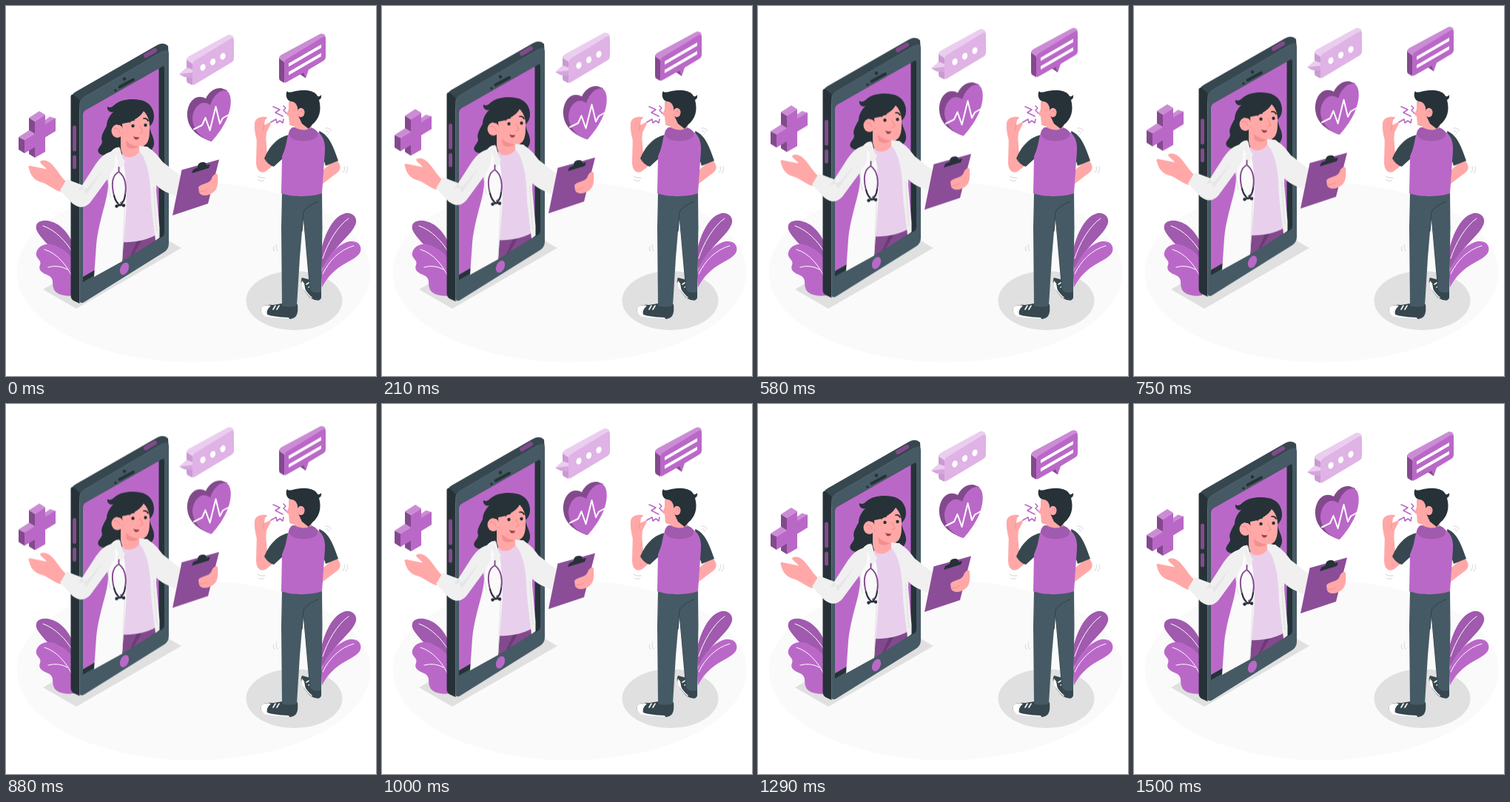
Write an HTML page that moves like this. It is 500 px wide and 500 px high and loops after 1.54 s.

```html
<!DOCTYPE html>
<html lang="en">
<head>
<meta charset="utf-8">
<title>Online doctor</title>
<style>
html, body { margin: 0; width: 100%; height: 100%; overflow: hidden; background: #fff; }
svg { display: block; width: 100vw; height: 100vh; }
.float { animation: float 1540ms linear infinite; }
@keyframes float {
  0% { transform: translateY(0); }
  47.1% { transform: translateY(-9.6px); }
  95.6% { transform: translateY(.4px); }
  97.4%, 100% { transform: translateY(0); }
}
.p { fill: #ba68c8; }
.pd { fill: #824a8c; }
.pm { fill: #a05aae; }
.pl { fill: #cb8cd5; }
.ink { fill: #263238; }
.slate { fill: #37474f; }
.steel { fill: #455a64; }
.skin { fill: #ffa8a7; }
.blush { fill: #f28f8f; }
.coat { fill: #fafafa; }
.sleeve { fill: #f0f0f0; }
.fold { fill: #e6e6e6; }
.w { fill: #fff; }
.grey { fill: #e0e0e0; }
.ln { fill: none; stroke-linecap: round; stroke-linejoin: round; }
.white { stroke: #fff; }
.dark { stroke: #263238; }
.shade { stroke: #d9d9d9; }
</style>
</head>
<body>
<svg viewBox="0 0 500 500">
  <!-- ground -->
  <ellipse cx="253.500" cy="360" rx="239" ry="121.500" fill="#fafafa"/>
  <path class="grey" d="M50 383L95 409L237 327L192 301Z"/>
  <ellipse class="grey" cx="389.500" cy="398" rx="65" ry="40"/>

  <!-- left plant -->
  <path class="pm" d="M92 346C75 340 53 322 43 306C37 296 43 289 55 290C73 292 86 308 92 326Z"/>
  <path class="ln white" d="M50 297C67 303 81 318 90 333"/>
  <path class="p" d="M92 391C82 393 67 391 64 381C62 373 65 368 57 364C49 361 43 357 46 350C49 343 39 341 41 333C44 322 59 318 71 326C82 331 88 338 92 346Z"/>
  <path class="ln white" d="M52 329C69 334 82 350 90 367M57 353Q71 349 83 356"/>

  <g class="float">
    <!-- phone -->
    <path class="slate" d="M88 127Q87 120 94 116L204 53Q213 48 219 54L220 70L106 134L100 140Z"/>
    <path class="ink" d="M87.500 122Q88 119 91 120L99.500 127V402L93 399Q87.500 397 87.500 391Z"/>
    <path class="steel" d="M99.500 135Q99.500 127 106 123L211 61.500Q220 56 220 66V321Q220 329 213 333L105 400.500Q99.500 403 99.500 397Z"/>
    <path class="ln" stroke="#5f737d" stroke-width=".6" d="M99.500 397V135Q99.500 127 106 123L211 61.500"/>
    <path class="ln" stroke="#824a8c" stroke-width="6" d="M189 67L201 60"/>
    <path class="ln" stroke="#824a8c" stroke-width="5" d="M92.500 164V194M92.500 204V218"/>
    <path class="ln dark" stroke-width="4" d="M153.500 109.500L172 99.500"/>
    <circle class="ink" cx="160" cy="98.500" r="2.200"/>
    <circle class="ink" cx="148" cy="114" r="1.800"/>
    <path class="ink" d="M104 146Q104 143 107 141L211 82Q214 80 214 84V307Q214 310 211 312L104 373Z"/>
    <path class="p" d="M104 146Q104 143 107 141L206.500 84.500V307L104 366Z"/>
    <ellipse class="p" cx="160" cy="355" rx="5.500" ry="8.800" transform="rotate(24 160 355)"/>

    <!-- doctor -->
    <path class="ink" d="M145 143C139 145 136 139 137 136C140 138 143 137 146 134C155 126 170 125 181 127C194 129 200 139 200 149C200 156 197 160 194 163C195 172 201 178 200 187C198 196 192 200 184 201L147 200C140 204 129 203 125 198C122 192 130 189 130 183C127 176 133 168 136 162C136 154 141 147 145 143Z"/>
    <path class="pd" d="M157 316L202 306V317L157 345Z"/>
    <path fill="#6c3b76" d="M177 318L168 338L172 336L184 316Z"/>
    <path fill="#e8d0ed" d="M157 198L183 194C193 203 197 230 198 252L203 309C190 317 171 320 156 319Z"/>
    <path class="sleeve" d="M178 190L191 190C199 196 203 205 204 217L203 250L207.500 300V313L202 317L197 275C194 248 198 220 178 190Z"/>
    <path class="ln shade" stroke-dasharray="3 2" d="M200 246Q201 276 204 305"/>
    <path class="sleeve" d="M182 189C197 190 205 202 212 211L238 231L229 257C214 251 205 246 199 237Z"/>
    <path class="coat" d="M150 191C136 196 133 216 137 234C142 253 126 283 122 323L119 366L157 345L162 278C164 249 162 218 154 192Z"/>
    <path class="ln shade" stroke-width=".8" d="M140 222Q136 238 141 257M161 260L157 342"/>
    <path class="skin" d="M82 238C74 231 69 221 62 214C56 208 48 207 46 210.500C47 214 52 216 55 220.500L33 216Q29 216 31 219.500C33 228 37 235 47 238C56 240 65 249 74 251Z"/>
    <path class="sleeve" d="M148 195C134 198 129 203 121 214L103 242L82 234L73 249L90 267C100 275 109 272 115 264L137 234L147 217Z"/>
    <path class="fold" d="M103 242L97 250L110 246L132 220L108 255Z"/>

    <path class="skin" d="M155 172L181 184V194C179 202 168 207 160 203Q155 198 155 190Z"/>
    <path class="blush" d="M162 181Q169 190 180 189Q171 196 163 190Z"/>
    <path class="skin" d="M157 159C169 158 180 151 186 142C193 149 195 159 194 169C194 184 189 190 181 190C172 189 162 183 158 178Z"/>
    <ellipse class="skin" cx="150.500" cy="169" rx="8" ry="9"/>
    <path class="ln" stroke="#f28f8f" d="M146 166Q152 163 154 171"/>
    <path class="ink" d="M150 160C156 163 158 159 158 156C173 156 183 149 186 141L175 133L151 142Z"/>
    <circle class="ink" cx="171.500" cy="162" r="2.200"/>
    <circle class="ink" cx="188.500" cy="161" r="2.200"/>
    <path class="ln dark" stroke-width="1.800" d="M167 157Q168 154 173 154M186 152Q190 151 192 155"/>
    <path class="ln" stroke="#f28f8f" stroke-width="1.200" d="M181 162L185 170L181 172"/>
    <path fill="#9c434a" d="M172 176Q176 178 180 177Q179 182 174 180Z"/>

    <path class="sleeve" d="M146 197L153 190Q154 203 161 210L155 222L150 215L152 210Z"/>
    <path class="sleeve" d="M180 196L180 189L188 190L197 209L192 212Z"/>
    <g class="ln" stroke-width="1.900">
      <path stroke="#824a8c" d="M152.500 218V224C143 229 143 242 145 252Q147 262 151 266M152.500 224C162 231 163 245 161 255Q160 264 155 266"/>
      <path class="dark" d="M146 256Q148 266 154 269Q160 266 161 255M149.500 270L158 269"/>
    </g>
    <circle class="ink" cx="149.500" cy="270.500" r="2.200"/>
    <circle class="ink" cx="159" cy="269.500" r="2.200"/>

    <!-- clipboard -->
    <path fill="#8b4d98" d="M237.500 221.500L288 207.500L273 267L225 283Z"/>
    <path class="ink" d="M251 226L253 221L259 218Q259 211 266 211Q271 211 271 215L276 214L274 219Z"/>
    <path class="skin" d="M260 245C264 239 275 241 278 233C279 228 286 224 286 229C287 239 286 247 281 251C274 257 264 258 261 252Z"/>
    <path class="ln" stroke="#f28f8f" d="M262 251Q268 251 272 248"/>

    <!-- cross -->
    <path class="pd" d="M17 177L25 181V199L17 194ZM31 151L39 156V173L31 168ZM31 195L39 190V205L31 200Z"/>
    <path class="pl" d="M17 177L31 168L39 172.500L25 181ZM31 151L45 142L53 147L39 156ZM53 154L59.500 149.500L67 152L53 161Z"/>
    <path class="p" d="M39 156L53 147V160L67 151.500V169L53 177.500V197L39 205V190.500L25 199V181L39 172.500Z"/>

    <!-- pale bubble -->
    <path fill="#ca9ad3" d="M244 71L252 76V107L246 104Q244 103 244 100Z"/>
    <path fill="#eacdef" d="M244 73Q244 70 247 68L300 39Q303 38 307 41L308 45L252 78Z"/>
    <path fill="#dfb3e5" d="M252 79Q252 76 255 74L304 44Q308 42 308 47V71Q308 74 305 76L255 106Q252 108 252 104Z"/>
    <path fill="#d5a5dd" d="M234 92L252 85V97L241 96Z"/>
    <path fill="#eacdef" d="M234 92L244 83L252 86V90Z"/>
    <g class="w">
      <ellipse cx="266" cy="83" rx="3.500" ry="4.700" transform="rotate(20 266 83)"/>
      <ellipse cx="279.500" cy="75.500" rx="3.500" ry="4.700" transform="rotate(20 279.500 75.500)"/>
      <ellipse cx="293" cy="68" rx="3.500" ry="4.700" transform="rotate(20 293 68)"/>
    </g>

    <!-- text bubble -->
    <path class="pd" d="M369 69L376 73V104L371 101Q369 100 369 97ZM397 92L405 97.500L406 88Z"/>
    <path class="pl" d="M369 71Q369 68 372 66L424 38Q427 36 431 39L432 43L376 76Z"/>
    <path class="p" d="M376 77Q376 74 379 72L428 42Q432 40 432 45V69Q432 72 429 74L409 86L405 97.500L402 90L379 103Q376 105 376 101Z"/>
    <path class="w" d="M382 77.500L426 52V56.500L382 82ZM382 89L426 63.500V68L382 93.500Z"/>

    <!-- heart -->
    <path class="pd" d="M277 183C260 177 246 166 245 149C244 131 256 117 270 125C274 116 282 110 291 111L299 114L282 145Z"/>
    <path class="p" d="M278 183C264 179 253 168 252 153C252 138 264 124 276 134C280 121 290 112 298 114.500C306 119 305 137 299 151C294 163 286 174 278 183Z"/>
    <path class="ln white" stroke-width="2" d="M254 166.500L265 161L269.500 151L275.500 168L283.500 136L289 159L293 151.500L301 147"/>
  </g>

  <!-- right plant -->
  <path class="pm" d="M426 330C431 306 443 285 456 281C465 277 475 284 473 293C469 309 445 321 427 356Z"/>
  <path class="ln white" d="M463 287C447 298 434 322 428 341"/>
  <path class="p" d="M426 361C433 336 452 319 466 318C478 317 482 327 478 334C469 347 445 347 427 380Z"/>
  <path class="ln white" d="M470 324C451 329 436 345 428 362"/>

  <!-- man -->
  <path class="slate" d="M400 367C396 374 402 384 409 392C414 398 425 400 426 394V385L413 383L411 370Z"/>
  <path class="ln white" stroke-width="1.500" d="M400 376Q405 388 413 394M406 376L411 373M409 380L413 377"/>
  <path class="w" d="M400 371Q397 379 405 386L403 375Z"/>
  <path class="slate" d="M346 406Q352 403 361 404L373 402L394 403C395 414 394 422 384 423L352 419C344 417 343 410 346 406Z"/>
  <path class="w" d="M346 406Q352 403 358 405Q351 411 353 417Q361 420 382 421L383 423L352 420C344 417 343 410 346 406Z"/>
  <path class="ln white" stroke-width="1.600" d="M361 410L364 405M366 410L369 405"/>

  <path class="skin" d="M446 207C452 213 454 220 448 225L427 241V223L437 214Z"/>
  <path class="slate" d="M423 169C437 174 443 192 449 209L432 216L426 198Z"/>
  <path class="slate" d="M400 260L427 250V300L426 382Q426 397 422 398L411 391L401 278Z"/>
  <path class="steel" d="M404 266L427 250L427.500 300L426 386Q418 390 411.500 384L401.500 281Z"/>
  <path class="steel" d="M373 251C390 257 412 257 427 250V266Q413 269 406 276L402 281L397 340L393 405Q383 408 373 405L372 300Z"/>
  <path class="ln" stroke="#37474f" stroke-width="1.300" d="M422 264Q407 270 402 278L400 304"/>

  <path class="skin" d="M339 174L338 211C338 224 346 228 353 222L366 211L353 200L351 176Z"/>
  <path class="skin" d="M336 158C337 151 345 149 352 150Q354 151 350 154L349 161L357 157Q359 158 356 163L352 171L351 181L339 182Q335 168 336 158Z"/>
  <path class="ln" stroke="#f28f8f" d="M349 161L347 168"/>
  <path class="slate" d="M384 174C367 176 355 191 349 206Q354 215 362 217L374 206L382 190Z"/>
  <path class="p" d="M387 166C378 171 382 184 373 203L372 253C387 259 414 258 427 253L431 196C432 180 426 171 415 167Z"/>
  <path class="pm" d="M387 164C380 169 381 176 388 180C398 184 414 183 420 177C423 171 420 167 412 164Z"/>
  <path class="skin" d="M390 153L413 151V164C407 169 397 168 390 164Z"/>
  <path class="skin" d="M382 129H400V161C393 164 385 163 383 160L382 149L379 147L382 139Z"/>
  <path class="ink" d="M385 129C379 128 377 119 380 115C382 119 390 114 400 114C411 113 419 117 421 122Q424 123 426 120Q427 125 423 127C427 141 423 153 414 160L409 166L400 159L394 146V137C392 131 389 129 385 129Z"/>
  <ellipse class="skin" cx="398.500" cy="144" rx="5" ry="6.200"/>
  <path class="ln" stroke="#f28f8f" d="M397 143Q401 140 402 145"/>

  <!-- cough and shiver -->
  <path class="ln" stroke="#ba68c8" stroke-width="1.600" d="M361 136L370 140L364 144L374 149M375 135L378 138L375 141L379 145M358 157L365 153L366 158L370 155L374 158L375 153"/>
  <path class="ln" stroke="#e0e0e0" stroke-width="1.300" d="M432 165Q437 164 439 169M432 169Q435 168 436 172M457 217Q459 221 455 225M461 217Q463 222 459 226M340 230Q344 233 350 232M341 235Q344 237 348 236M362 325Q360 328 363 331M366 322Q364 327 367 331"/>
</svg>
</body>
</html>
```
